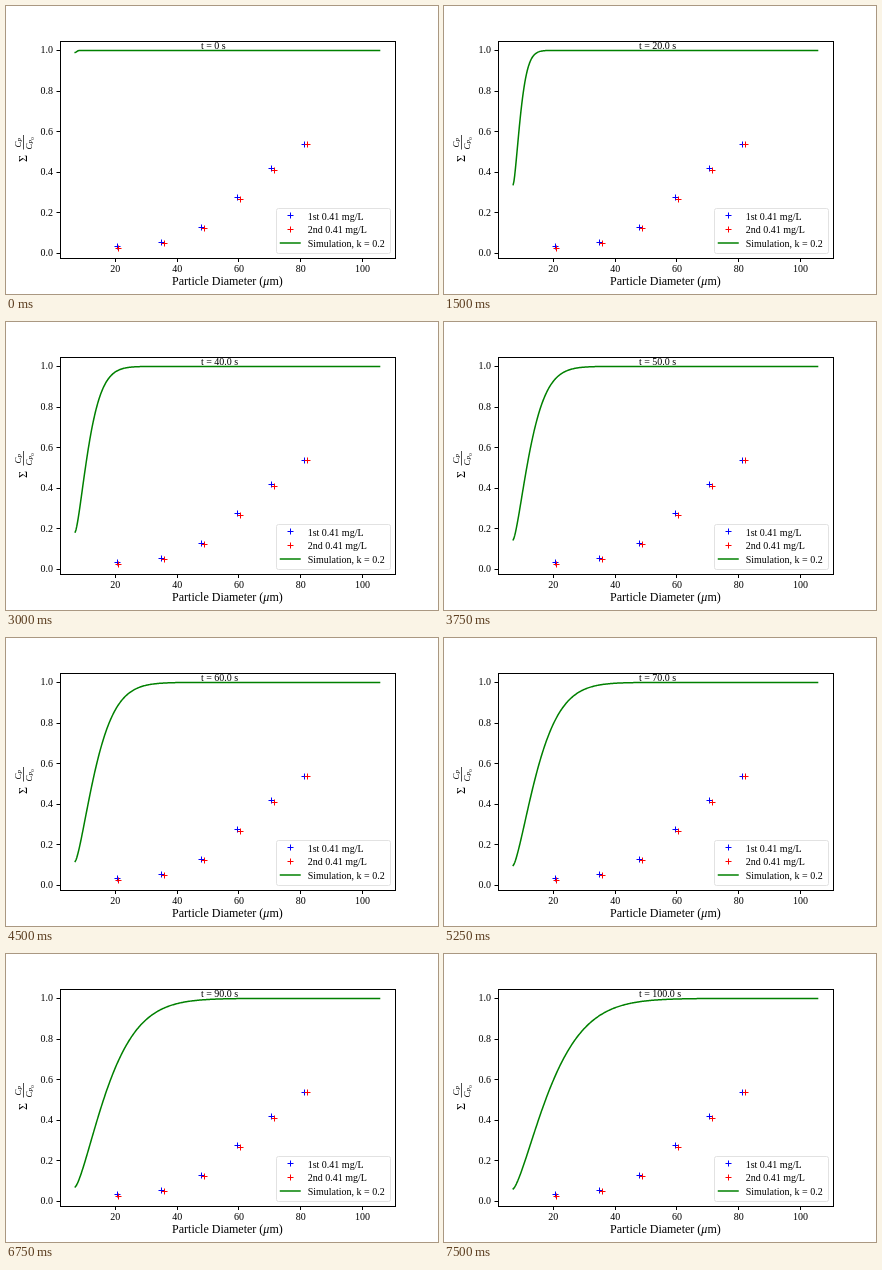
Animation of 432 by 288 pixels, one loop 8 s. Source, as an HTML page:

```html
<!DOCTYPE html>
<html lang="en">
<head>
<meta charset="utf-8">
<title>Particle simulation</title>
<style>
  html, body { margin: 0; width: 100%; height: 100%; overflow: hidden; background: #fff; }
  svg { display: block; width: 100vw; height: 100vh; font: 10px "Liberation Serif", serif; }
  .label { font-size: 12px; }
  .axis { fill: none; stroke: #000; }
  .curve { fill: none; stroke: #008000; stroke-width: 1.5; stroke-linejoin: round; stroke-linecap: square; }
  .math { font-style: italic; }
</style>
</head>
<body>
<svg viewBox="0 0 432 288">
  <path id="curve" class="curve"/>
  <g id="marks"></g>
  <g id="axes"><rect class="axis" x="54.5" y="35.5" width="335" height="217"/></g>
  <text id="clock" x="194.9" y="43.3"></text>
  <text class="label" x="221.4" y="279" text-anchor="middle">Particle Diameter (<tspan class="math">μ</tspan>m)</text>
  <g transform="translate(20.5 156) rotate(-90)">
    <text class="label">Σ</text>
    <g class="math" font-size="8.8">
      <text x="14.5" y="-6">C<tspan font-size="6.2" dy="1.5">P</tspan></text>
      <text x="12.5" y="5">C<tspan font-size="6.2" dy="1.5">P</tspan><tspan font-size="4.8" font-style="normal" dy="1">0</tspan></text>
    </g>
    <path class="axis" stroke-width=".7" d="M12.5 -3H27"/>
  </g>
  <rect x="270.5" y="202.5" width="114" height="45" rx="2" fill="#fff" fill-opacity=".8" stroke="#e2e2e2"/>
  <g id="legend">
    <path class="curve" d="M274.5 237H294"/>
    <text x="301.7" y="214">1st 0.41 mg/L</text>
    <text x="301.7" y="227">2nd 0.41 mg/L</text>
    <text x="301.7" y="241">Simulation, k = 0.2</text>
  </g>
</svg>
<script>
const $ = id => document.getElementById(id);
const px = d => 69.2 + (d - 7) * 3.09;
const py = v => 247.6 - v * 203.2;

function add(parent, tag, attrs, text = "") {
  const el = document.createElementNS("http://www.w3.org/2000/svg", tag);
  for (const key in attrs) el.setAttribute(key, attrs[key]);
  el.textContent = text;
  parent.append(el);
}

const plus = (parent, x, y, stroke) =>
  add(parent, "path", { d: `M${x - 3} ${y}h6M${x} ${y - 3}v6`, stroke });

for (let d = 20; d <= 100; d += 20) {
  const x = Math.floor(px(d)) + .5;
  add($("axes"), "path", { class: "axis", d: `M${x} 252.5v3.5` });
  add($("axes"), "text", { x: px(d), y: 266, "text-anchor": "middle" }, d);
}
for (let i = 0; i <= 5; i++) {
  const y = Math.floor(py(i / 5)) + .5;
  add($("axes"), "path", { class: "axis", d: `M54.5 ${y}h-4` });
  add($("axes"), "text", { x: 47, y: py(i / 5) + 2.85, "text-anchor": "end" }, (i / 5).toFixed(1));
}

const first = [[111.5, 240.5], [155.5, 236.5], [195.5, 221.5], [231.5, 191.5], [265.5, 162.5], [298.5, 138.5]];
const second = [[112.5, 242.5], [158.5, 237.5], [198.5, 222.5], [234.5, 193.5], [268.5, 164.5], [301.5, 138.5]];
first.forEach(([x, y]) => plus($("marks"), x, y, "#00f"));
second.forEach(([x, y]) => plus($("marks"), x, y, "#f00"));
plus($("legend"), 284.5, 209.5, "#00f");
plus($("legend"), 284.5, 223.5, "#f00");

// Remaining fraction for diameter d after t seconds: small particles vanish first.
function fraction(d, t) {
  const start = 1 / (1.01 + .084 * t + .00065 * t * t);
  const width = .7 + .105 * t + .00035 * t * t;
  const power = 1.33 + 4 / (t + 10);
  return 1 - (1 - start) * Math.exp(-(((d - 7) / width) ** power));
}

let shown = -1;
function draw() {
  const t = Math.floor(performance.now() % 8000 / 750) * 10;
  if (t !== shown) {
    shown = t;
    const points = Array.from({ length: 395 }, (_, i) => {
      const d = 7 + i / 4;
      return `${px(d).toFixed(2)} ${py(fraction(d, t)).toFixed(2)}`;
    });
    $("curve").setAttribute("d", "M" + points.join("L"));
    $("clock").textContent = `t = ${t ? t.toFixed(1) : 0} s`;
  }
  requestAnimationFrame(draw);
}
draw();
</script>
</body>
</html>
```
